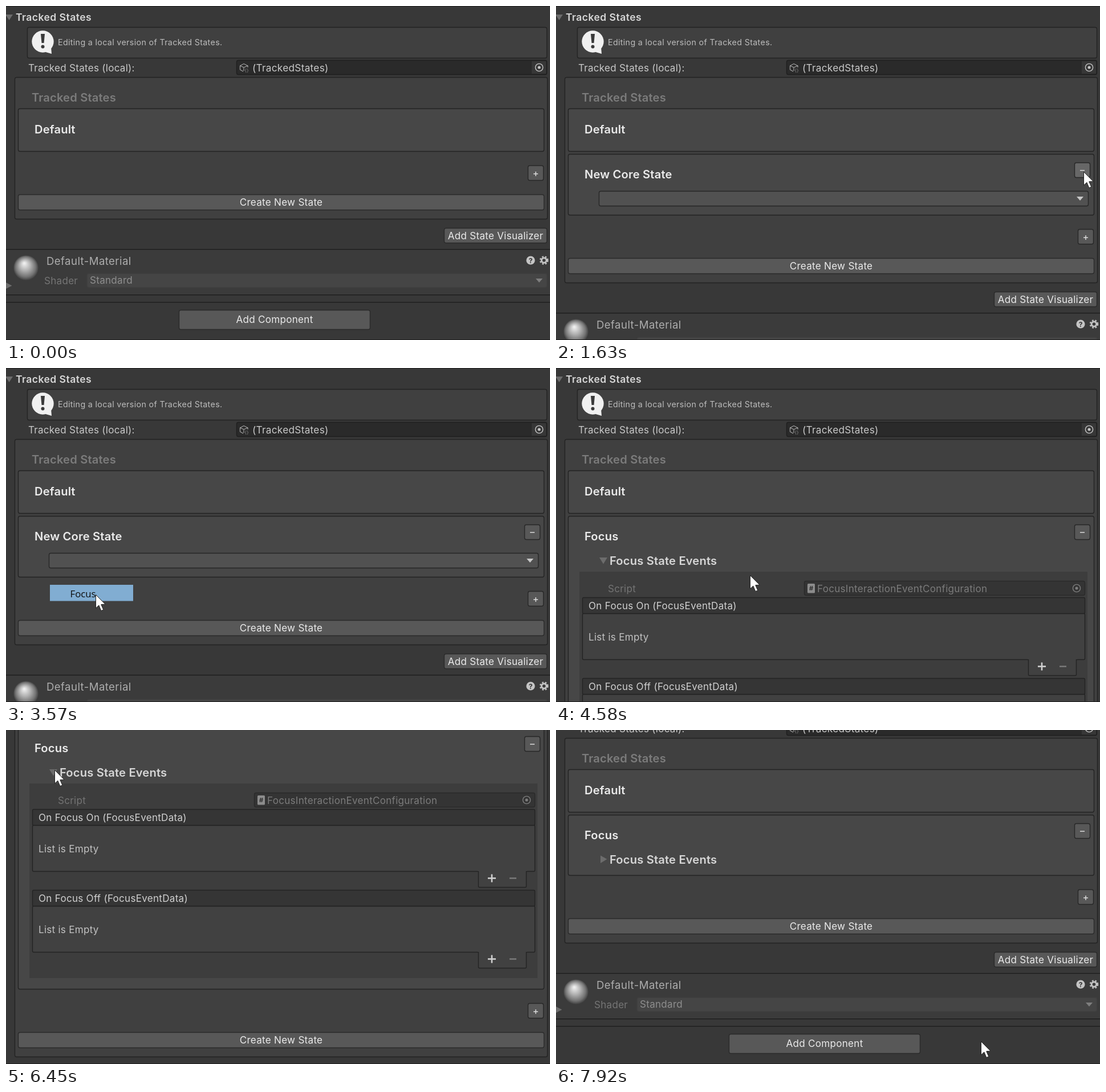
Animation of 954x587 px, one loop 7.99 s. Source, as an HTML page with a canvas:

```html
<!DOCTYPE html>
<html lang="en">
<head>
<meta charset="utf-8">
<title>State inspector</title>
<style>
html, body { margin: 0; width: 100%; height: 100%; overflow: hidden; background: #383838; }
canvas { display: block; }
</style>
</head>
<body>
<canvas id="stage" width="954" height="587"></canvas>
<script>
const ctx = document.getElementById('stage').getContext('2d');
const LOOP = 7990;
const EDGE = '#232323', LABEL = '#c8c8c8', BRIGHT = '#eaeaea', DIM = '#7b7b7b';

// Cursor moves: start, end, number of steps, destination x, y
const MOVES = [
  [250, 640, 6, 846, 217], [720, 1020, 5, 925, 299], [1090, 1091, 1, 925, 293],
  [1240, 1630, 6, 925, 291], [1860, 2550, 10, 151, 337], [2950, 3330, 6, 157, 398],
  [4120, 4580, 7, 340, 364], [4900, 4901, 1, 342, 364], [5680, 5990, 5, 56, 96],
  [6060, 6140, 2, 85, 70], [6600, 7060, 7, 534, 361], [7690, 7920, 4, 745, 547]
];
const ADDED = 1240, MENU = 2720, PICKED = 3500, EXPANDED = 3660, SCROLLED = 4750, COLLAPSED = 6520;

function cursorAt(t) {
  let x = 960, y = 440;
  for (const [start, end, steps, toX, toY] of MOVES) {
    if (t < start) break;
    const step = Math.floor((t - start) / (end - start) * (steps - 1) + 1e-6) + 1;
    const p = Math.min(1, step / steps), e = p * p * (3 - 2 * p);
    x += (toX - x) * e;
    y += (toY - y) * e;
  }
  return { x, y };
}

function box(x, y, right, bottom, fill, stroke = EDGE, r = 3) {
  ctx.beginPath();
  ctx.roundRect(x + .5, y + .5, right - x - 1, bottom - y - 1, r);
  ctx.fillStyle = fill;
  ctx.fill();
  ctx.strokeStyle = stroke;
  ctx.lineWidth = 1.4;
  ctx.stroke();
}

function rect(x, y, w, h, fill) {
  ctx.fillStyle = fill;
  ctx.fillRect(x, y, w, h);
}

function poly(fill, ...points) {
  ctx.beginPath();
  for (let i = 0; i < points.length; i += 2) ctx.lineTo(points[i], points[i + 1]);
  ctx.closePath();
  ctx.fillStyle = fill;
  ctx.fill();
}

function disc(x, y, r, fill) {
  ctx.beginPath();
  ctx.arc(x, y, r, 0, 7);
  ctx.fillStyle = fill;
  ctx.fill();
}

function ring(x, y, r, color, width) {
  ctx.beginPath();
  ctx.arc(x, y, r, 0, 7);
  ctx.strokeStyle = color;
  ctx.lineWidth = width;
  ctx.stroke();
}

// y is the middle of the capital letters
function text(str, x, y, color = LABEL, size = 17.1, { weight = 400, align = 'left', gap = .25, family = 'Inter' } = {}) {
  ctx.font = `${weight} ${size}px ${family}, sans-serif`;
  ctx.letterSpacing = gap + 'px';
  ctx.textAlign = align;
  ctx.fillStyle = color;
  ctx.fillText(str, x, y + size * .36);
}

const title = (str, x, y, color = BRIGHT) => text(str, x, y, color, 20.2, { weight: 600, gap: .14 });

function button(label, x, y, right, bottom, textY) {
  box(x, y, right, bottom, '#585858', '#2a2a2a');
  text(label, (x + right) / 2, textY, BRIGHT, 17.1, { align: 'center' });
}

function sign(x, y, half, width, color, plus) {
  rect(x - half, y - width / 2, half * 2, width, color);
  if (plus) rect(x - width / 2, y - half, width, half * 2, color);
}

function smallButton(x, y, plus, pointer) {
  const hover = pointer.x >= x && pointer.x < x + 28 && pointer.y >= y && pointer.y < y + 27;
  box(x, y, x + 28, y + 27, hover ? '#676767' : '#585858', '#272727');
  sign(x + 14, y + (plus ? 15 : 14), 4, 1.4, '#e4e4e4', plus);
}

function picker(x, y, color) {
  ring(x, y, 6.6, color, 1.4);
  disc(x, y, 2.5, color);
}

function header() {
  rect(0, 0, 954, 1, '#1f1f1f');
  poly('#6c6c6c', -1, 15, 12, 15, 5.5, 25);
  text('Tracked States', 17, 20, '#d6d6d6', 17.6, { weight: 600, gap: .42 });

  box(37, 37, 949, 92, '#404040');
  disc(64.5, 62.5, 19.2, '#f0f0f0');
  poly('#f0f0f0', 66, 80, 80, 84, 79, 72);
  poly('#3a3a3a', 61, 49, 68, 49, 66.5, 65, 62.5, 65);
  disc(64.5, 71.5, 3, '#3a3a3a');
  text('Editing a local version of Tracked States.', 91, 64, '#bcbcbc', 14.3, { gap: .33 });

  text('Tracked States (local):', 39, 108.5);
  box(404, 95, 949, 121, '#2a2a2a', '#1f1f1f');
  rect(922, 97, 25, 22, '#373737');
  picker(935, 108, '#c6c6c6');
  ctx.beginPath();
  for (const [x, y] of [[424, 108], [424, 105], [417, 101.5], [410.5, 105], [410.5, 112], [416, 115]]) ctx.lineTo(x, y);
  ctx.moveTo(410.5, 105); ctx.lineTo(417, 108); ctx.lineTo(424, 105);
  ctx.moveTo(417, 108); ctx.lineTo(417, 114);
  ctx.strokeStyle = '#aaa';
  ctx.lineWidth = 1.1;
  ctx.stroke();
  text('{}', 418.5, 113, '#888', 8);
  text('(TrackedStates)', 432, 109, LABEL, 17.3);
}

function eventList(name, y) {
  box(46, y + 28, 928, y + 110, '#414141', EDGE, 2);
  box(46, y, 928, y + 29, '#353535', EDGE, 2);
  text(name + ' (FocusEventData)', 57, y + 15, '#d0d0d0');
  text('List is Empty', 57, y + 70, '#c2c2c2');
  box(828, y + 107, 913, y + 138, '#414141', EDGE, 2);
  rect(827, y + 105, 87, 4, '#414141');
  sign(852, y + 121.5, 7, 2.6, '#d0d0d0', true);
  sign(889, y + 121.5, 6, 2.4, '#7c7c7c');
}

function focusEvents() {
  rect(41, 358, 891, 342, '#3d3d3d');
  text('Script', 91, 387.5, '#747474');
  box(435, 374, 928, 400, '#343434', '#2a2a2a');
  picker(913, 387, '#7e7e7e');
  ctx.beginPath();
  ctx.roundRect(441, 379, 13, 16.5, 1.5);
  ctx.fillStyle = '#8c8c8c';
  ctx.fill();
  text('#', 447.5, 387.5, '#303030', 11, { weight: 700, align: 'center', gap: 0 });
  text('FocusInteractionEventConfiguration', 458, 388, DIM);
  eventList('On Focus On', 403);
  eventList('On Focus Off', 545);
}

function secondState(t, extra, pointer) {
  box(21, 260, 944, 256 + extra, '#474747');
  title(t < EXPANDED ? 'New Core State' : 'Focus', 50, 296);
  smallButton(909, 275, false, pointer);
  if (t < EXPANDED) {
    box(75, 325, 934, 352, '#515151', '#272727');
    poly('#c8c8c8', 913, 335, 925, 335, 919, 342);
    return;
  }
  title('Focus State Events', 94, 338.5, '#d6d6d6');
  if (t < COLLAPSED) {
    poly('#6c6c6c', 76, 333, 90, 333, 83, 344.5);
    focusEvents();
  } else {
    poly('#6c6c6c', 78, 331.5, 78, 345, 89.5, 338);
  }
}

function material() {
  rect(0, 427, 954, 81, '#3b3b3b');
  for (const y of [427, 507, 520]) rect(0, y, 954, 1.4, '#1d1d1d');
  const shade = ctx.createRadialGradient(32, 452, 1, 35, 460, 22);
  shade.addColorStop(0, '#efefef');
  shade.addColorStop(.4, '#b4b4b4');
  shade.addColorStop(.8, '#727272');
  shade.addColorStop(1, '#404040');
  disc(35, 460, 21.8, shade);
  poly('#6c6c6c', 0, 486, 0, 497, 10.5, 491.5);
  text('Default-Material', 71, 448.5, '#adadad', 18.6, { gap: .42 });
  disc(920, 447, 7.6, '#c4c4c4');
  text('?', 920, 447.2, '#333', 12, { weight: 700, align: 'center', gap: 0 });
  ring(943.5, 447, 4.3, '#c4c4c4', 3);
  ctx.setLineDash([2.75, 2.75]);
  ring(943.5, 447, 6.65, '#c4c4c4', 2.4);
  ctx.setLineDash([]);
  text('Shader', 67, 482.5, '#757575');
  box(142, 470, 949, 495, '#454545', '#404040');
  text('Standard', 147, 482, '#8e8e8e');
  poly('#7e7e7e', 929, 479, 941, 479, 935, 486);
}

function menu(t, cursor) {
  const open = t < PICKED;
  const alpha = open
    ? Math.min(1, .1 + .33 * Math.floor((t - MENU) / 75))
    : Math.max(0, 1 - .2 * Math.floor((t - PICKED + 8) / 78));
  const litRow = open ? Math.floor((cursor.y - 353) / 28) : 1;
  const ink = 64 * (1 - alpha);

  ctx.globalAlpha = alpha;
  if (open) {
    rect(76, 352, 149, 115, '#f2f2f2');
    ctx.strokeStyle = '#ccc';
    ctx.lineWidth = 1;
    ctx.strokeRect(75.5, 351.5, 150, 116);
  }
  if (litRow >= 0) rect(77, 353 + 28 * litRow, 146, 28.5, '#91c9f7');

  // Ink fades from the panel grey, as if menu and text were one layer
  ctx.globalAlpha = alpha > 0 ? 1 : 0;
  ['Default', 'Focus', 'Touch', 'Grab'].forEach((name, i) => {
    if (open || i === litRow)
      text(name, 112.5, 369 + 28 * i, `rgb(${ink},${ink},${ink})`, 16.8, { family: '"Open Sans"', gap: 0 });
  });
  ctx.globalAlpha = 1;
}

function arrow({ x, y }) {
  ctx.save();
  ctx.translate(x, y);
  poly('#fff', .5, .5, .5, 24, 5.8, 19, 9.8, 28.6, 13.8, 26.9, 9.8, 17.6, 17, 17.2);
  ctx.strokeStyle = '#222';
  ctx.lineWidth = 1;
  ctx.stroke();
  ctx.restore();
}

function draw(now) {
  const t = now % LOOP;
  const cursor = cursorAt(t);
  const extra = t < ADDED ? 0 : t < EXPANDED ? 112 : t < COLLAPSED ? 464 : 111;
  const scroll = t < SCROLLED ? 0 : t < COLLAPSED ? 264 : 111;
  const pointer = { x: cursor.x, y: cursor.y + scroll };

  rect(0, 0, 954, 587, '#383838');
  ctx.save();
  ctx.translate(0, -scroll);
  header();
  box(15, 125, 950, 375 + extra, '#404040');
  title('Tracked States', 45, 161, DIM);
  box(21, 180, 944, 256, '#474747');
  title('Default', 50, 216.5);
  if (t >= ADDED) secondState(t, extra, pointer);

  ctx.translate(0, extra);
  smallButton(915, 280, true, { x: pointer.x, y: pointer.y - extra });
  button('Create New State', 21, 331, 944, 359, 345);
  button('Add State Visualizer', 768, 390, 949, 417, 404);
  material();
  button('Add Component', 303, 534, 639, 569, 551);
  ctx.restore();

  rect(0, 586, 954, 1, '#1f1f1f');
  if (t >= MENU && t < 3890) menu(t, cursor);
  arrow(cursor);
  requestAnimationFrame(draw);
}
requestAnimationFrame(draw);
</script>
</body>
</html>
```
